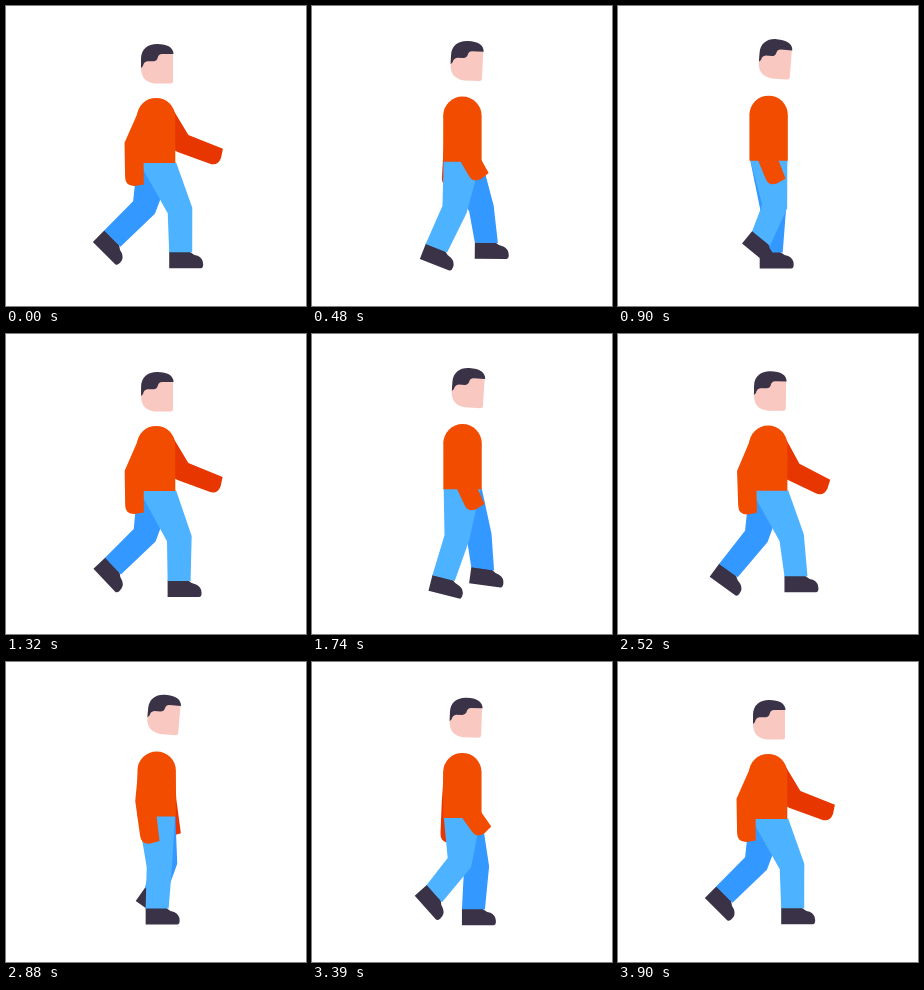
An HTML page for the animation above (3.93 s loop, 300 by 300 pixels).

```html
<!DOCTYPE html>
<html lang="en">
<head>
<meta charset="utf-8">
<title>Walk cycle</title>
<style>
  html, body { margin: 0; width: 100%; height: 100%; overflow: hidden; background: #fff; }
  svg { display: block; width: 100vw; height: 100vh; }
  .shirt { fill: #f14c00; }
  .sleeve { fill: #e83600; }
  .near { fill: #4db2ff; }
  .far { fill: #3398ff; }
  .dark { fill: #3a3347; }
  .skin { fill: #f9c8c0; }
</style>
</head>
<body>
<svg viewBox="0 0 300 300">
  <defs>
    <path id="shoe" d="M-11.5-.5H9Q13 3 17 3.5Q22.5 6 22.5 12Q22.5 16 20 16H-11.5Z"/>
  </defs>
  <path id="farArm" class="sleeve"/>
  <use id="farShoe" href="#shoe" class="dark"/>
  <path id="farLeg" class="far"/>
  <use id="nearShoe" href="#shoe" class="dark"/>
  <path id="nearLeg" class="near"/>
  <path id="torso" class="shirt" d="M131.5 154.5V108.5a19.2 19.2 0 0 1 38.4 0V154.5Z"/>
  <path id="nearArm" class="shirt"/>
  <g id="head">
    <path class="skin" d="M-16-2L-10-8L0-12H16V17Q16 19.5 13.5 19.5H-2Q-16 18-16 4Z"/>
    <path class="dark" d="M-16 4V-5C-16-15-9-20 0-20Q16-20 16.5-10H5Q1.500-9.800 .8-6.500Q0-3-3.500-2.800H-9.500Q-13.500-2-14 2Z"/>
  </g>
</svg>
<script>
const LOOP = 3930, STEP = 30, CYCLE = 1300, TURN = 2 * Math.PI;

const $ = id => document.getElementById(id);

// Periodic motion: a mean plus cosine and sine harmonics
function wave(phase, mean, cosines, sines = []) {
  const sum = (list, f) => list.reduce((s, k, i) => s + k * f((i + 1) * TURN * phase), 0);
  return mean + sum(cosines, Math.cos) + sum(sines, Math.sin);
}

const kneeAt = p => [wave(p, 156, [16.2, 0, 1.8], [-5.2]), wave(p, 203, [1.5], [2])];
const ankleAt = p => [
  wave(p, 146, [32.1, -5.5, 2.1], [-5.4, -3, -1.3]),
  wave(p, 239.5, [5.3, 0, 1.5], [7])
];
// The shoe lies flat in stance and tips forward as the heel lifts
const shoeAngle = p => Math.max(0, wave(p - .075, 11, [-38]));

const nearArm = {
  elbow: p => [wave(p, 141, [-13], [1]), 140],
  hand: p => [wave(p, 152, [-25.7, 2.2]), wave(p, 177, [6.5, -3.5])]
};
const farArm = {
  elbow: p => [wave(p, 156, [21]), wave(p, 139.5, [-2])],
  hand: p => [wave(p, 166, [39.5, 9.5]), wave(p, 171.5, [-13.5, -6])]
};

const unit = (x, y) => { const l = Math.hypot(x, y) || 1; return [x / l, y / l]; };
const dir = (a, b) => unit(b[0] - a[0], b[1] - a[1]);
const move = (p, d, k) => [p[0] + d[0] * k, p[1] + d[1] * k];
const front = d => [d[1], -d[0]];
const pt = p => p.map(v => v.toFixed(2)).join(' ');

// Forward direction across the joint b
function bend(a, b, c) {
  const u = dir(a, b), v = dir(b, c);
  return front(unit(u[0] + v[0], u[1] + v[1]));
}

function drawLeg(side, phase, hipY) {
  const knee = kneeAt(phase), ankle = ankleAt(phase), angle = shoeAngle(phase);
  const hip = [150.5 + (knee[0] - 151) * .05, hipY];
  const k = bend(hip, knee, ankle), r = angle * Math.PI / 180;
  const sole = [Math.cos(r), Math.sin(r)];
  const points = [
    move(hip, [1, 0], -18.5), move(hip, [1, 0], 18.5),
    move(knee, k, 12.6), move(ankle, sole, 11.5),
    move(ankle, sole, -11.5), move(knee, k, -12.6)
  ];
  $(side + 'Leg').setAttribute('d', 'M' + points.map(pt).join('L') + 'Z');
  $(side + 'Shoe').setAttribute('transform', `translate(${pt(ankle)}) rotate(${angle.toFixed(2)})`);
}

function drawArm(side, arm, phase, shoulder) {
  const elbow = arm.elbow(phase), hand = arm.hand(phase);
  const s = front(dir(shoulder, elbow)), e = bend(shoulder, elbow, hand);
  const d = dir(elbow, hand), h = front(d);
  const back = move(hand, h, -9.3);
  const edge = [
    move(shoulder, s, -19), move(shoulder, s, 19), move(elbow, e, 10),
    move(move(hand, h, 9.3), d, -1.5), hand
  ];
  $(side + 'Arm').setAttribute('d', 'M' + edge.map(pt).join('L')
    + `Q${pt(back)} ${pt(move(back, d, -9))}L${pt(move(elbow, e, -10))}Z`);
}

function draw(time) {
  const phase = time / CYCLE;
  const dip = Math.cos(2 * TURN * phase);
  const low = 1.3 * (1 + dip), shift = -.3 * (1 + dip);
  const shoulder = [150.7 + shift, 108.5 + low];
  drawArm('far', farArm, phase, shoulder);
  drawLeg('far', phase + .5, 154 + low);
  drawLeg('near', phase, 154 + low);
  drawArm('near', nearArm, phase, shoulder);
  $('torso').setAttribute('transform', `translate(${shift} ${low})`);
  $('head').setAttribute('transform',
    `translate(${154.5 - 3.5 * dip} ${55.2 + 2.8 * dip}) rotate(${2.5 * (1 - dip)})`);
}

const start = performance.now();
function tick() {
  const t = (performance.now() - start) % LOOP;
  draw(Math.floor(t / STEP) * STEP);
  requestAnimationFrame(tick);
}
tick();
</script>
</body>
</html>
```
